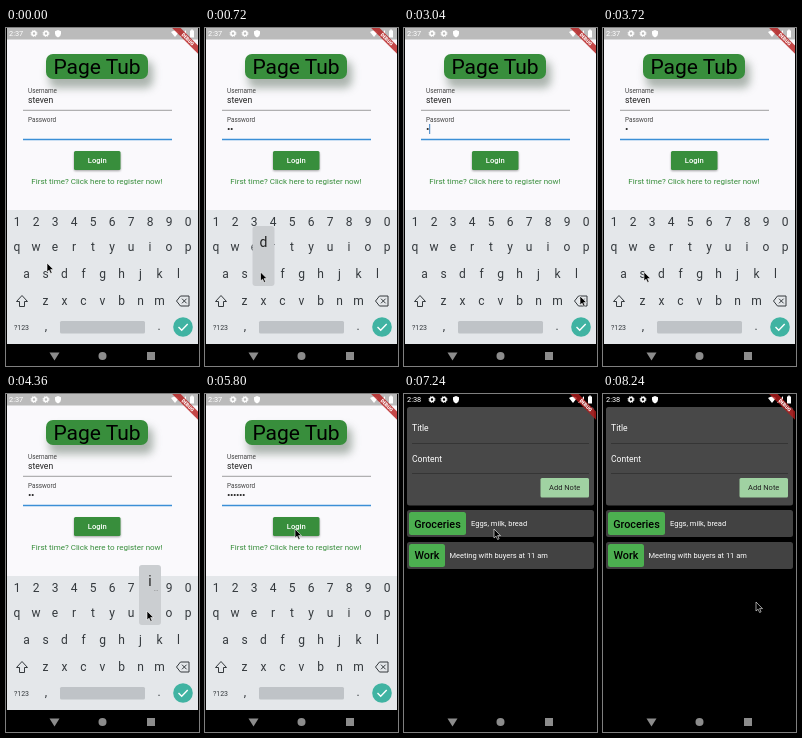
An HTML page for the animation above (8.32 s loop, 193 by 338 pixels).

```html
<!DOCTYPE html>
<html lang="en">
<head>
<meta charset="utf-8">
<style>
  html, body { margin: 0; height: 100%; overflow: hidden; background: #000; }
  svg { display: block; width: 100vw; height: 100vh; }
  text { font-family: Roboto, sans-serif; dominant-baseline: central; white-space: pre; }
  .mid { text-anchor: middle; }
  .bold { font-weight: 500; }
  #keys { font-size: 12px; fill: #34393d; }
</style>
</head>
<body>
<svg viewBox="0 0 193 338" preserveAspectRatio="none">
  <defs>
    <filter id="soft" x="-30%" y="-60%" width="160%" height="240%"><feGaussianBlur stdDeviation="4"/></filter>
    <filter id="low" x="-20%" y="-30%" width="140%" height="180%"><feGaussianBlur stdDeviation="1"/></filter>
    <g id="gear"><circle r="2" fill="none" stroke="#fff" stroke-width="1.6"/><circle r="3" fill="none" stroke="#fff" stroke-width="1" stroke-dasharray="1.2 1.156"/></g>
  </defs>

  <g id="login">
    <rect width="193" height="338" fill="#faf9fc"/>
    <rect width="193" height="11.5" fill="#bbb"/>
    <rect x="43" y="33" width="104" height="27" rx="7" fill="#5d7060" opacity=".5" filter="url(#soft)"/>
    <rect x="40" y="26" width="102" height="25" rx="7" fill="#388e3c"/>
    <text class="mid" x="91" y="38.5" font-size="21">Page Tub</text>
    <g fill="#444" font-size="6.4">
      <text x="22" y="62.5">Username</text>
      <text x="22" y="91.8">Password</text>
    </g>
    <text x="22" y="72.3" font-size="8.6" fill="#222">steven</text>
    <path d="M17 82.3h149" stroke="#777" stroke-width=".7"/>
    <path d="M17 111.5h149" stroke="#3b8fd6" stroke-width="1.3"/>
    <g id="dots" fill="#222"></g>
    <path id="caret" stroke="#3b7fc0" stroke-width="1"/>
    <rect x="68" y="124.5" width="46.500" height="18.500" rx="1.500" opacity=".35" filter="url(#low)"/>
    <rect x="68" y="123" width="46.500" height="19" rx="1.500" fill="#388e3c"/>
    <text class="mid bold" x="91.300" y="132.600" font-size="7.600" fill="#fff">Login</text>
    <text class="mid" x="91" y="153" font-size="8" fill="#388e3c">First time? Click here to register now!</text>
  </g>

  <g id="notes">
    <rect width="193" height="338"/>
    <g fill="#424242">
      <rect x="3" y="13" width="187" height="98.500" rx="2.500" fill="#484848"/>
      <rect x="3" y="116" width="187" height="27" rx="2.500"/>
      <rect x="3" y="148" width="187" height="27" rx="2.500"/>
    </g>
    <path d="M8 49.500h177M8 79.500h177" stroke="#303030" stroke-width=".8"/>
    <rect x="136.500" y="84" width="48.500" height="19.500" rx="1.500" fill="#a0d2a2"/>
    <g fill="#4caf50">
      <rect x="5" y="118" width="57" height="23" rx="2.500"/>
      <rect x="5" y="150" width="36" height="23" rx="2.500"/>
    </g>
    <g fill="#fff">
      <text x="8" y="33.500" font-size="8.600">Title</text>
      <text x="8" y="65" font-size="8.600">Content</text>
      <text x="67" y="129.500" font-size="7.500">Eggs, milk, bread</text>
      <text x="45.500" y="161" font-size="7.500">Meeting with buyers at 11 am</text>
    </g>
    <text class="mid" x="160.700" y="93.700" font-size="7.500" fill="#222">Add Note</text>
    <text class="mid bold" x="33.500" y="130" font-size="10.800">Groceries</text>
    <text class="mid bold" x="23" y="161.500" font-size="10.800">Work</text>
  </g>

  <g fill="#fff">
    <text id="clock" x="3" y="5.700" font-size="7.400"></text>
    <use href="#gear" x="28" y="5.500"/>
    <use href="#gear" x="40" y="5.500"/>
    <path d="M52 2l3 1.200v2.500q0 2.500-3 3.800q-3-1.300-3-3.800v-2.500z"/>
    <path d="M165 4q4-3 8 0l-4 5z M174 9l6-7v7z M184 2.500h1.200v-1h1.600v1h1.200v7h-4z"/>
  </g>
  <g transform="translate(193 0) rotate(45)">
    <rect x="-20" y="13" width="40" height="6" fill="#b71c1c" opacity=".8"/>
    <text class="mid" y="16" font-size="4.800" font-weight="900" fill="#fff">DEBUG</text>
  </g>

  <g id="keyboard">
    <rect y="182" width="193" height="135" fill="#e4e7ea"/>
    <rect id="erase" x="166" y="261" width="24" height="24" rx="3" fill="#cbced1"/>
    <g id="keys"></g>
    <g fill="none" stroke="#34393d" stroke-width="1">
      <path d="M16 267.500l5.500 6h-3v5h-5v-5h-3z"/>
      <path d="M170.500 273l4-5h8.500v10h-8.500zM176 270.700l4.600 4.600m0-4.600l-4.600 4.600"/>
    </g>
    <rect x="54" y="293" width="85" height="12.500" rx="1.500" fill="#bfc3c7"/>
    <circle cx="177" cy="299" r="9.800" fill="#40b3a2"/>
    <path d="M172.500 299l3.200 3.200 6-6.200" fill="none" stroke="#fff" stroke-width="1.400"/>
    <g id="popup">
      <rect x="-11" y="-48" width="22" height="60" rx="3" fill="#cbced1"/>
      <text id="letter" class="mid" y="-32" font-size="14" fill="#222"></text>
      <text id="more" class="mid" x="6" y="-25" font-size="6" fill="#555">...</text>
    </g>
  </g>

  <rect y="316" width="193" height="22"/>
  <g fill="#8c8c8c">
    <path d="M43.500 324.500h10l-5 8z" id="back"/>
    <circle cx="96.500" cy="328" r="4"/>
    <rect x="141" y="324" width="8" height="8"/>
  </g>
  <path d="M.5 0v338M192.500 0v338" stroke="#000"/>
  <path id="cursor" d="M0 0v9l2.100-1.800 1.500 3.300 1.500-.7-1.500-3.200h2.900z" stroke="#fff" stroke-width=".6"/>
</svg>
<script>
const $ = id => document.getElementById(id);
const LOOP = 8320, HOLD = 160;
const keyAt = {};
const rows = [['1234567890', 11, 194], ['qwertyuiop', 11, 219], ['asdfghjkl', 20.5, 246], ['zxcvbnm', 39.5, 273]];

const label = (s, x, y, size = 12) =>
  `<text class="mid" x="${x}" y="${y}" font-size="${size}">${s}</text>`;
let html = label('?123', 15.5, 299.5, 7) + label(',', 40, 298) + label('.', 153, 298);
for (const [chars, x0, y] of rows)
  [...chars].forEach((c, i) => {
    keyAt[c] = [x0 + 19 * i, y];
    html += label(c, x0 + 19 * i, y);
  });
$('keys').innerHTML = html;
$('dots').innerHTML = Array.from({ length: 6 }, (_, i) =>
  `<circle cx="${23.7 + 3 * i}" cy="101" r="1.050"/>`).join('');

const strokes = [
  [120, 's'], [380, 'i'], [640, 'd'], [900, 'a'], [1160, 'l'],
  [3460, 'd'], [3860, 'a'], [4320, 'i'], [4700, 's'], [5060, 'e'], [5380, 'l']
];
const erases = [2400, 2560, 2720, 2880, 3120];

// Cursor stops: time, x, y
const stops = [
  [0, 41, 235], [1600, 96.5, 131], [1740, 96.5, 131], [2220, 176, 268], [3180, 176, 268],
  [5700, 90, 135], [7640, 90, 135], [8200, 153, 208], [LOOP, 153, 208]
];
for (const [at, key] of strokes) {
  const [x, y] = keyAt[key];
  stops.push([at, x - 3, y - 2], [at + HOLD, x - 3, y - 2]);
}
stops.sort((a, b) => a[0] - b[0]);

const ramp = (t, from, to) => Math.min(1, Math.max(0, (t - from) / (to - from)));
const smooth = p => p * p * (3 - 2 * p);
const show = (id, on) => $(id).setAttribute('visibility', on ? 'visible' : 'hidden');
const move = (id, x, y) => $(id).setAttribute('transform', `translate(${x} ${y})`);

function draw(t) {
  const i = stops.findIndex(s => s[0] > t);
  const [t0, x0, y0] = stops[i - 1], [t1, x1, y1] = stops[i];
  const p = smooth(ramp(t, t0, t1));
  move('cursor', x0 + (x1 - x0) * p, y0 + (y1 - y0) * p);

  const count = strokes.filter(s => t >= s[0] + HOLD).length - erases.filter(e => t >= e).length;
  [...$('dots').children].forEach((dot, n) => dot.setAttribute('visibility', n < count ? 'inherit' : 'hidden'));
  $('caret').setAttribute('d', `M${22.7 + 3 * count} 96v10`);
  show('caret', t % 520 >= 260 && t < 6800);

  const held = strokes.find(s => t >= s[0] && t < s[0] + HOLD);
  show('popup', held);
  show('more', held && 'aeiousl'.includes(held[1]));
  if (held) {
    move('popup', ...keyAt[held[1]]);
    $('letter').textContent = held[1];
  }
  show('erase', erases.some(e => t >= e - 60 && t < e + 20));

  move('keyboard', 0, 140 * smooth(ramp(t, 6790, 6910)));
  const enter = ramp(t, 6980, 7240);
  $('notes').setAttribute('opacity', enter);
  move('notes', 0, 84 * (1 - enter) ** 2);
  $('clock').textContent = t < 6400 ? '2:37' : '2:38';
}

const start = performance.now();
function tick() {
  draw((performance.now() - start) % LOOP);
  requestAnimationFrame(tick);
}
tick();
</script>
</body>
</html>
```
